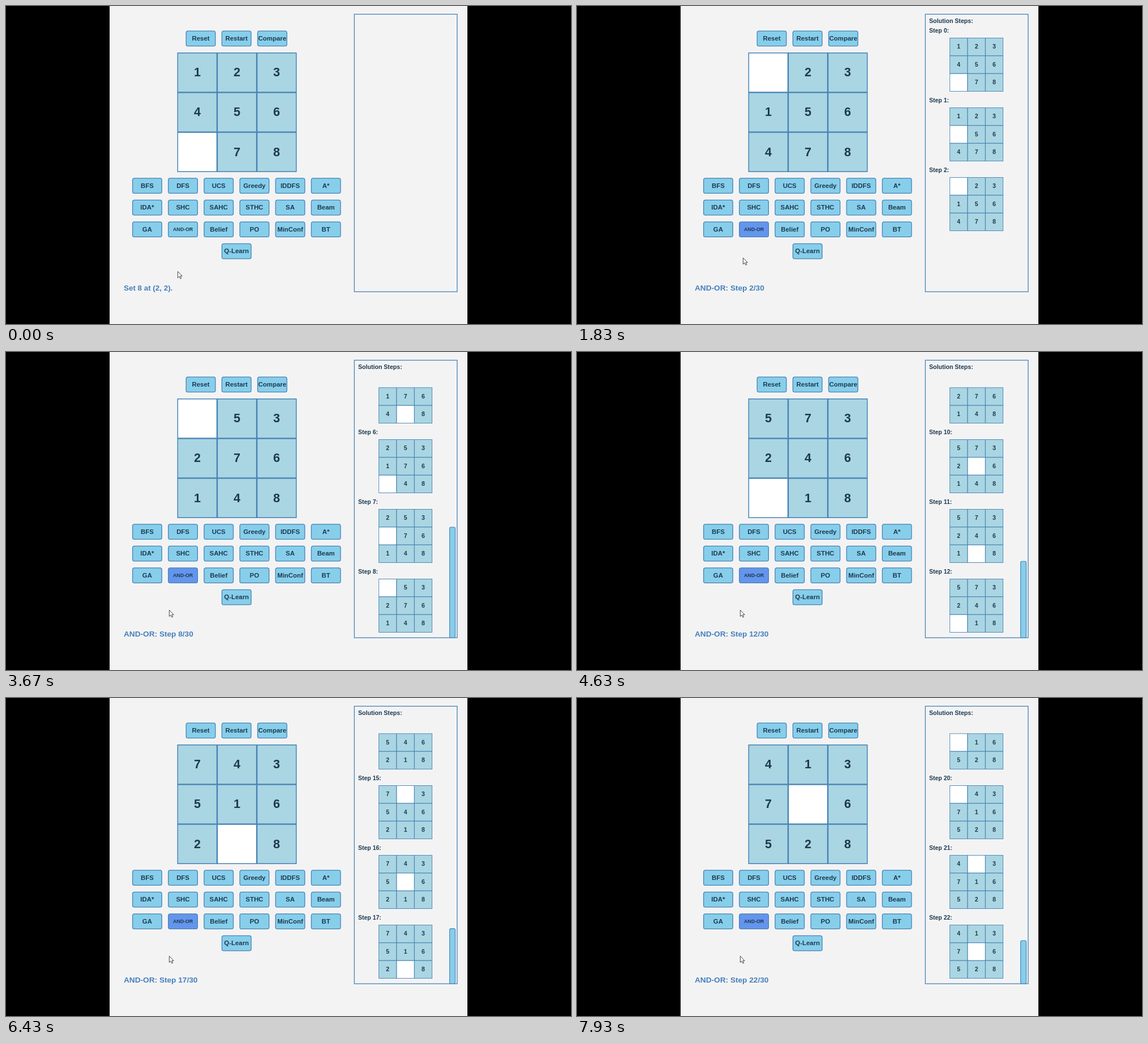
Animation, 998 px wide and 561 px high, one loop 8000 ms. Source, as an HTML page:

```html
<!DOCTYPE html>
<html lang="en">
<head>
<meta charset="utf-8">
<title>Eight puzzle solver</title>
<style>
  html, body { margin: 0; width: 100%; height: 100%; overflow: hidden; background: #000; }
  svg { display: block; width: 100%; height: 100%; }
  text { font-family: "Liberation Sans", Arial, sans-serif; font-weight: bold; fill: #1d3a4f; white-space: pre; }
</style>
</head>
<body>
<svg viewBox="0 0 998 561">
  <rect width="998" height="561" fill="#000"/>
  <rect x="183" width="632" height="561" fill="#f3f3f4"/>
  <g id="buttons"></g>
  <g id="board"></g>
  <rect x="615.3" y="14.5" width="181.6" height="489.6" fill="none" stroke="#4682b4" stroke-width="1.3"/>
  <g id="panel"></g>
  <g id="status"></g>
  <path id="cursor" d="M0 0V11.2L2.6 8.8L4.5 12.8L6.3 12L4.5 8.1H7.8Z" fill="#fff" stroke="#333" stroke-width=".9"/>
</svg>
<script>
const LOOP = 8000, LAST_STEP = 22, TOTAL = 30;
const EDGE = '#4682b4', TILE = '#aad5e2', BUTTON = '#87ceeb', ACTIVE = '#6495ed';
const $ = id => document.getElementById(id);

// Blank position changes: up, up, right, down, down, left, repeated.
const MOVES = [-3, -3, 1, 3, 3, -1];
const states = [[1, 2, 3, 4, 5, 6, 0, 7, 8]];
for (let i = 0; i < LAST_STEP; i++) {
  const next = states[i].slice(), blank = next.indexOf(0), to = blank + MOVES[i % 6];
  [next[blank], next[to]] = [next[to], 0];
  states.push(next);
}

const label = (s, x, y, size, anchor = 'middle', fill = '') =>
  `<text x="${x}" y="${y + size * 0.35}" font-size="${size}" text-anchor="${anchor}"` +
  `${fill && ` style="fill:${fill}"`}>${s}</text>`;

const box = (x, y, w, h, fill, stroke, rx = 0) =>
  `<rect x="${x}" y="${y}" width="${w}" height="${h}" rx="${rx}" fill="${fill}" stroke="${EDGE}" stroke-width="${stroke}"/>`;

function grid(state, x, y, pitch, size, font, stroke, firstRow = 0) {
  return state.map((n, i) => {
    const row = Math.floor(i / 3);
    if (row < firstRow) return '';
    const tx = x + (i % 3) * pitch, ty = y + row * pitch;
    return box(tx, ty, size, size, n ? TILE : '#fff', stroke) +
      (n ? label(n, tx + size / 2, ty + size / 2 - 0.6, font) : '');
  }).join('');
}

const ROWS = [
  [344, 57.3, 'Reset Restart Compare'],
  [249.4, 317, 'BFS DFS UCS Greedy IDDFS A*'],
  [249.4, 355.5, 'IDA* SHC SAHC STHC SA Beam'],
  [249.4, 394, 'GA AND-OR Belief PO MinConf BT'],
  [407.2, 432.5, 'Q-Learn']
];

function drawButtons(active) {
  $('buttons').innerHTML = ROWS.map(([x, y, names]) => names.split(' ').map((name, i) => {
    const cx = x + i * 63.15, small = name === 'AND-OR';
    return box(cx - 25.8, y - 13.2, 51.6, 26.6, small && active ? ACTIVE : BUTTON, 1.3, 3.2) +
      label(name, cx, y - 0.2, small ? 8.8 : 11.4);
  }).join('')).join('');
}

function drawPanel(step) {
  if (step < 0) return '';
  let out = label('Solution Steps:', 622, 26, 10.6, 'start');
  const scroll = Math.max(0, step - 3) * 123 + (step > 2 ? 25 : 0);
  for (let k = Math.max(0, step - 3); k <= step; k++) {
    const y = 43.3 + k * 123 - scroll;
    if (y > 40) out += label(`Step ${k}:`, 622, y, 10.5, 'start');
    out += grid(states[k], 658.6, y + 13.2, 31.4, 31.2, 10.5, 0.9, y > 40 ? 0 : 1);
  }
  if (scroll) {
    const h = 214350 / ((step + 1) * 123 - 8);
    out += box(783.6, 504 - h, 9.9, h, BUTTON, 1.1, 2.5);
  }
  return out;
}

function stepAt(t) {
  if (t < 900) return -1;
  const step = t < 2190 ? Math.floor((t - 900) / 322.5 + 0.04) : 4 + Math.floor((t - 2190) / 303);
  return Math.min(step, LAST_STEP);
}

const glide = (t, from, to) => {
  const p = Math.min(1, Math.max(0, (t - from) / (to - from)));
  return p * p * (3 - 2 * p);
};

let shown = '';
function render(t) {
  const step = stepAt(t), active = t >= 130, key = step + '|' + active;
  if (key !== shown) {
    shown = key;
    drawButtons(active);
    $('board').innerHTML = grid(states[Math.max(0, step)], 303.3, 82.8, 70.1, 69.2, 21.5, 1.5);
    $('panel').innerHTML = drawPanel(step);
    const message = step < 0 ? 'Set 8 at (2, 2).' : `AND-OR: Step ${step}/${TOTAL}`;
    $('status').innerHTML = label(message, 208, 497.3, step < 0 ? 13.4 : 13.65, 'start', '#4680bb');
  }
  const a = glide(t, 20, 200), b = glide(t, 1400, 2000);
  $('cursor').setAttribute('transform', `translate(${303.4 + 11 * a - 26 * b} ${468.3 - 70 * a + 57 * b})`);
}

const start = performance.now();
function tick() {
  render((performance.now() - start) % LOOP);
  requestAnimationFrame(tick);
}
tick();
</script>
</body>
</html>
```
